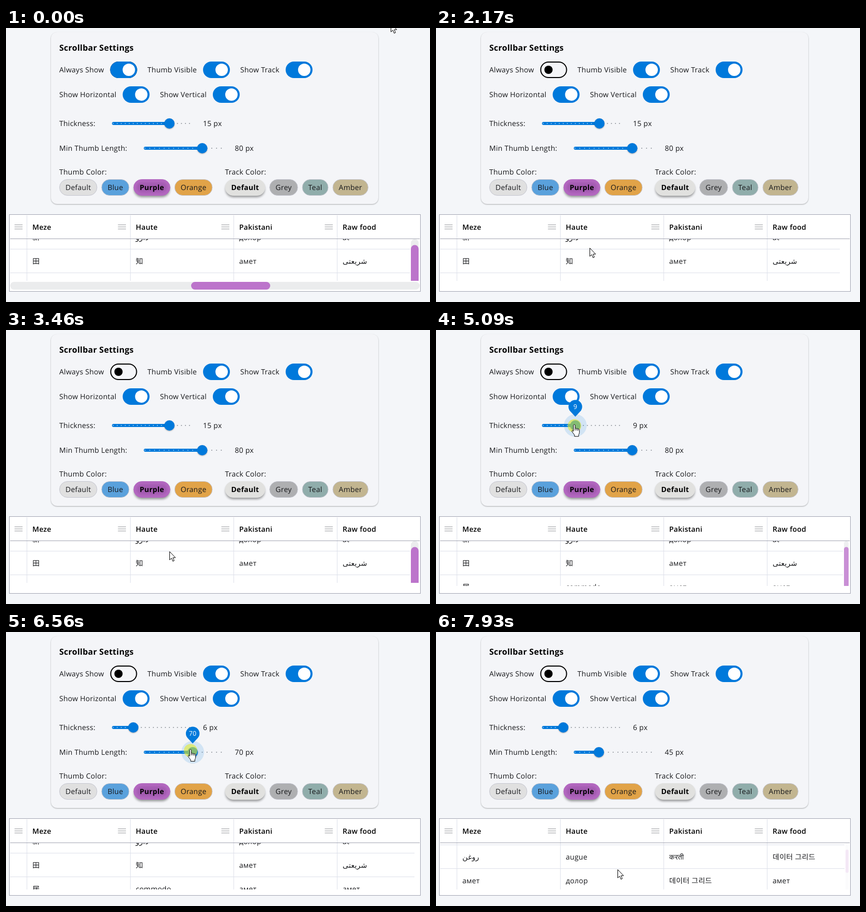
Animation, 820 px wide and 531 px high, one loop 8 s. Source, as an HTML page:

```html
<!DOCTYPE html>
<html lang="en">
<head>
<meta charset="utf-8">
<style>
html, body { margin: 0; width: 100%; height: 100%; overflow: hidden; background: #f4f6f9; }
svg { display: block; }
text { font: 14px "Open Sans", "Noto Sans", "Noto Sans CJK SC", "Noto Sans CJK KR", "DejaVu Sans", sans-serif; letter-spacing: .25px; fill: #17181b; white-space: pre; text-rendering: geometricPrecision; }
.bold { font-weight: 700; fill: #000; }
.semi { font-weight: 600; fill: #000; }
.title { font-size: 16px; }
.value { font-size: 12.5px; fill: #fff; text-anchor: middle; }
</style>
</head>
<body>
<svg width="820" height="531" viewBox="0 0 820 531">
  <defs>
    <filter id="soft" x="-20%" y="-40%" width="140%" height="200%"><feGaussianBlur stdDeviation="2"/></filter>
    <filter id="edge" x="-20%" y="-20%" width="140%" height="140%"><feGaussianBlur stdDeviation="1"/></filter>
    <clipPath id="view"><rect id="viewRect" x="8" y="409"/></clipPath>
  </defs>
  <text id="ruler" visibility="hidden"></text>
  <g id="still"></g>
  <g id="live"></g>
</svg>
<script>
const LOOP = 8000, LEFT = 103, COLUMN = 200, ROW = 46;
const BLUE = '#0079db', PURPLE = '#bc74cb', LINE = '#dde0ea', BORDER = '#a3a5b2';
const $ = id => document.getElementById(id);

const text = (x, y, s, cls = '') => `<text x="${x}" y="${y}" class="${cls}">${s}</text>`;
const rect = (x, y, w, h, r, fill, attrs = '') =>
  `<rect x="${x}" y="${y}" width="${w}" height="${h}" rx="${r}" fill="${fill}" ${attrs}/>`;
const circle = (x, y, r, fill, attrs = '') => `<circle cx="${x}" cy="${y}" r="${r}" fill="${fill}" ${attrs}/>`;
const path = (d, stroke, attrs = '') => `<path d="${d}" stroke="${stroke}" fill="none" ${attrs}/>`;

function widthOf(s, cls = '') {
  $('ruler').setAttribute('class', cls);
  $('ruler').textContent = s;
  return $('ruler').getComputedTextLength();
}

const ramp = (t, start, length) => Math.min(1, Math.max(0, (t - start) / length));
const smooth = (t, start, length) => { const k = ramp(t, start, length); return k * k * (3 - 2 * k); };
const pulse = (t, on, off, length = 100) => ramp(t, on, length) - ramp(t, off, length);
const within = (t, a, b) => t >= a && t < b;

const TOGGLES = [['Always Show', 'Thumb Visible', 'Show Track'], ['Show Horizontal', 'Show Vertical']];
const THUMB_COLORS = { Default: '#e0e0e0', Blue: '#5aa1dc', Purple: '#b368c0', Orange: '#e1a348' };
const TRACK_COLORS = { Default: '#e1e1df', Grey: '#aeafb1', Teal: '#90adab', Amber: '#c2b590' };
const HEADERS = ['Meze', 'Haute', 'Pakistani', 'Raw food'];
const ROWS = [
  ['新', 'دارو', 'долор', 'at'],
  ['田', '知', 'амет', 'شريعتى'],
  ['居', 'commodo', 'амет', 'амет'],
  ['долор', 'करती', '知', 'augue'],
  ['commodo', 'амет', 'روغن', '田'],
  ['روغن', 'augue', 'करती', '데이터 그리드'],
  ['амет', 'долор', '데이터 그리드', 'амет'],
  ['知', 'at', 'долор', 'commodo']
];

// Pointer moves; arc bends the path downwards
const MOVES = [
  { start: 70, length: 800, x: 231, y: 83, arc: 85 },
  { start: 1130, length: 430, x: 247, y: 283 },
  { start: 1850, length: 320, x: 297, y: 426 },
  { start: 2310, length: 280, x: 316, y: 429 },
  { start: 4080, length: 740, x: 314, y: 183 },
  { start: 4950, length: 230, x: 243, y: 184 },
  { start: 5400, length: 300, x: 317, y: 209 },
  { start: 5700, length: 320, x: 378, y: 231 },
  { start: 6350, length: 550, x: 311, y: 222 },
  { start: 7150, length: 400, x: 340, y: 492 },
  { start: 7550, length: 230, x: 351, y: 460 }
];

function toggleRow(labels, y) {
  let x = LEFT, s = '';
  for (const label of labels) {
    s += text(x, y + 21, label);
    x += widthOf(label) + 12;
    if (label !== 'Always Show') s += rect(x, y, 52, 32, 16, BLUE) + circle(x + 36, y + 16, 12, '#fff');
    x += 72;
  }
  return s;
}

function chipGroup(x, title, colors, selected) {
  let s = text(x, 284, title);
  for (const [label, fill] of Object.entries(colors)) {
    const on = label === selected, cls = on ? 'bold' : '', w = widthOf(label, cls) + 24;
    if (on) s += rect(x + 1, 297, w - 2, 31, 15, '#000', 'opacity=".38" filter="url(#soft)"');
    s += rect(x + .5, 293.5, w - 1, 31, 15.5, fill, `stroke="${on ? fill : '#c5c6d0'}"`);
    if (label === 'Purple') s += rect(x + 6, 299, w - 12, 20, 10, '#a058ae', 'opacity=".8" filter="url(#soft)"');
    s += text(x + 12, 314, label, cls);
    x += w + 8;
  }
  return [s, x + 16];
}

function panel() {
  const [thumbs, next] = chipGroup(LEFT, 'Thumb Color:', THUMB_COLORS, 'Purple');
  const [tracks] = chipGroup(next, 'Track Color:', TRACK_COLORS, 'Default');
  return rect(87, 9, 633, 333, 12, '#000', 'opacity=".3" filter="url(#edge)"') +
    rect(87, 8, 633, 333, 12, '#f4f5f8') +
    text(LEFT, 44, 'Scrollbar Settings', 'bold title') +
    TOGGLES.map((labels, i) => toggleRow(labels, 65 + 48 * i)).join('') + thumbs + tracks;
}

function gridFrame() {
  return rect(6.5, 361.5, 795, 149, 0, '#fff', `stroke="${BORDER}"`) +
    HEADERS.map((name, i) => {
      const x = i * COLUMN;
      return path(`M${x + 40.5} 363V408`, LINE) + text(x + 51, 391, name, 'semi') +
        path(`M${x + 16.5} 381.5h15.5m0 4h-15.5m0 4h15.5`, '#97999d', 'stroke-width="1.2"');
    }).join('') + path('M8 408.5H800', BORDER);
}

function firstToggle(t) {
  const off = ramp(t, 980, 170), left = LEFT + widthOf('Always Show') + 12, x = left + 36 - 20 * off;
  const ink = Math.round(255 * (1 - off));
  return rect(left + 1, 66, 50, 30, 15, '#f4f5f8', 'stroke="#000" stroke-width="2"') +
    rect(left, 65, 52, 32, 16, BLUE, `opacity="${1 - off}"`) +
    circle(x, 81, 20, '#000', `opacity="${.1 * pulse(t, 940, 1200)}"`) +
    circle(x, 81, 12 - 4 * off, `rgb(${ink},${ink},${ink})`);
}

function slider(label, y, { min, max, step }, v, halo, drop) {
  const left = LEFT + widthOf(label) + 32, start = left + 2.4;
  const count = (max - min) / step, gap = 147.5 / count, x = start + (v - min) / step * gap;
  let s = text(LEFT, y + 5, label) + rect(left, y - 3, x - left, 6, 3, BLUE);
  for (let i = 0; i <= count; i++) {
    const dot = start + i * gap;
    s += circle(dot, y, 1, dot < x ? '#9dcbf0' : '#8b9097');
  }
  s += circle(x, y, 22 * halo, BLUE, 'opacity=".14"') +
    circle(x, y + 1, 10, '#000', 'opacity=".3" filter="url(#edge)"') + circle(x, y, 10, BLUE);
  if (drop > 0) s += `<g transform="translate(${x} ${y - 17}) scale(${drop})">
    <path d="M0 0L-9.800 -10.5A13.2 13.2 0 1 1 9.8 -10.5Z" fill="${BLUE}"/>${text(0, -15, v, 'value')}</g>`;
  return s + text(left + 176, y + 5, v + ' px');
}

function gridBody(thick, scroll) {
  $('viewRect').setAttribute('width', 788 - thick);
  $('viewRect').setAttribute('height', 96 - thick);
  const rows = ROWS.map((cells, i) => {
    const y = 411 + i * ROW - scroll;
    return path(`M8 ${y + 17.5}H800`, LINE) + cells.map((cell, c) => text(51 + c * COLUMN, y, cell)).join('');
  });
  const lines = HEADERS.map((_, c) => path(`M${c * COLUMN + 40.5} 409V510`, LINE));
  return `<g clip-path="url(#view)">${rows.join('')}${lines.join('')}</g>`;
}

function bars(thick, scroll, minLength, showV, showH) {
  const x = 798 - thick, y = 507 - thick, bottom = 505 - thick, r = thick / 2;
  const top = 420.5 + scroll * .006;
  const column = (from, to, fill) => {
    const cut = to > bottom, end = cut ? bottom : to - r;
    return `<path fill="${fill}" d="M${x} ${from + r}a${r} ${r} 0 0 1 ${thick} 0V${end}` +
      (cut ? `H${x}Z"/>` : `a${r} ${r} 0 0 1 ${-thick} 0Z"/>`);
  };
  return `<g opacity="${showV}">${column(409, 600, '#ebeced')}${column(top, top + minLength, PURPLE)}</g>
    <g opacity="${showH}">${rect(8, y, 792, thick, r, '#ebeced')}${rect(358, y, 153, thick, r, PURPLE)}</g>`;
}

function pointer(t) {
  let x = 744, y = -9;
  for (const move of MOVES) {
    const k = smooth(t, move.start, move.length);
    x += (move.x - x) * k;
    y += (move.y - y) * k + (move.arc || 0) * 4 * k * (1 - k);
  }
  const over = (left, right, top, bottom) => within(x, left, right) && within(y, top, bottom);
  const hand = over(202, 254, 65, 97) || over(200, 362, 168, 203) || over(262, 422, 208, 250);
  const pressed = within(t, 900, 1070) || within(t, 4880, 5280) || within(t, 6340, 7010);
  const shape = hand
    ? '<path transform="translate(-5 -1)" d="M4.2 2.3c0-2.4 3.2-2.4 3.2 0v6.2c.4-1.2 2.7-1 2.9.4 .5-1 2.6-.8 2.7.6 .6-.8 2.7-.5 2.7 1.1V16c0 2.2-1.5 3.2-1.5 5v2.5h-8v-2c0-1.8-3-4-4.7-7.3-.9-2 .9-2.9 2.7-.5ZM7.4 8.5V12M10.3 9v3M13 9.600v3"/>'
    : '<path d="M.5 .5v16l3.7-3.300 2.5 6 2.6-1.2-2.5-5.800h4.900Z"/>';
  return (pressed ? circle(x + 1, y + 2, 13, '#e3ec28', 'opacity=".58"') : '') +
    `<g transform="translate(${x} ${y})" fill="#fff" stroke="#000" stroke-linejoin="round">${shape}</g>`;
}

// Wheel notches of 100 px: two down and back, later two down again
function wheel(t) {
  const notches = within(t, 2980, 3460) + within(t, 3050, 3250) + (t >= 7850) + (t >= 7915);
  return 100 * notches;
}

function draw(t) {
  const thick = Math.round(15 - 9 * ramp(t, 4950, 210));
  const length = 5 * Math.round((80 - 35 * smooth(t, 6350, 550)) / 5);
  const scroll = wheel(t);
  const showH = 1 - ramp(t, 1100, 300);
  const showV = showH + pulse(t, 2910, 5040, 260) + ramp(t, 7890, 260);
  $('live').innerHTML = firstToggle(t) +
    slider('Thickness:', 185, { min: 1, max: 20, step: 1 }, thick, pulse(t, 4750, 5350), pulse(t, 4880, 5310)) +
    slider('Min Thumb Length:', 233, { min: 20, max: 100, step: 5 }, length, pulse(t, 5960, 7030), pulse(t, 6330, 7030)) +
    gridBody(thick, scroll) + bars(thick, scroll, length, showV, showH) + pointer(t);
}

$('still').innerHTML = panel() + gridFrame();
const begin = performance.now();
function frame() {
  draw((performance.now() - begin) % LOOP);
  requestAnimationFrame(frame);
}
frame();
</script>
</body>
</html>
```
